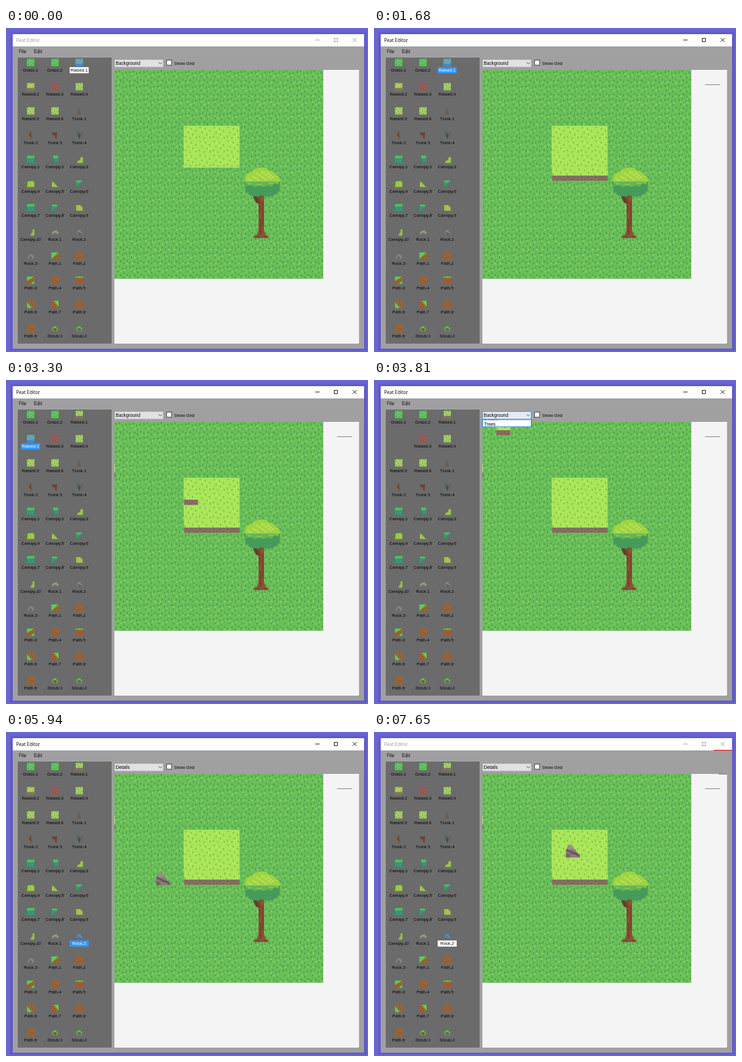
An HTML page that plays this animation: 648x580 px, repeating every 7770 ms.

```html
<!DOCTYPE html>
<html lang="en">
<head>
<meta charset="utf-8">
<title>Tile editor</title>
<style>
html, body { margin: 0; width: 100%; height: 100%; overflow: hidden; background: #6a65d4; }
svg { display: block; }
text { font-family: "Liberation Sans", Arial, sans-serif; font-size: 7.8px; }
.ui { font-family: "Open Sans", "Noto Sans", sans-serif; font-size: 8.4px; }
.combo { font-size: 8.2px; }
</style>
</head>
<body>
<svg id="stage" width="648" height="580" viewBox="0 0 648 580"></svg>
<script>
const LOOP = 7770, T = 374 / 15, MX = 194, MY = 75;
const NS = "http://www.w3.org/2000/svg";
const stage = document.getElementById("stage");

function el(name, attrs, parent = stage, text) {
  const e = document.createElementNS(NS, name);
  for (const k in attrs) e.setAttribute(k, attrs[k]);
  if (text) e.textContent = text;
  parent.appendChild(e);
  return e;
}
const box = (x, y, w, h, fill, p, more) => el("rect", { x, y, width: w, height: h, fill, ...more }, p);
const poly = (points, fill, p) => el("polygon", { points, fill }, p);
const line = (d, stroke, p, w = 1) => el("path", { d, stroke, fill: "none", "stroke-width": w }, p);
const show = (e, on) => e.setAttribute("display", on ? "inline" : "none");
const paint = (e, fill) => e.setAttribute("fill", fill);

// Tile patterns
const defs = el("defs", {});
const blades = (list, h) => list.map(([x, y]) => `M${x} ${y}h1.6v${h}h-1.6z`).join("");
function pattern(id, base, layers) {
  const p = el("pattern", { id, width: T, height: T, patternUnits: "userSpaceOnUse",
    patternTransform: `translate(${MX} ${MY})` }, defs);
  box(0, 0, T + 1, T + 1, base, p);
  for (const [color, list, h] of layers) el("path", { d: blades(list, h), fill: color }, p);
}
pattern("grass", "#6abf59", [
  ["#419753", [[2, 2], [8, 0.5], [14, 5], [20, 3], [5, 10], [16, 12], [22, 16], [10, 17], [2, 19], [16, 20.5]], 3.4],
  ["#54aa55", [[4, 3.5], [15.6, 13.5], [11.6, 18], [20.5, 5]], 2.6],
  ["#a4df55", [[5.5, 6], [18, 8], [11, 11], [6.5, 21], [22, 21.5]], 2.8]
]);
pattern("raised", "#abe659", [
  ["#66ad51", [[3, 2], [12.5, 4], [20, 8], [6.5, 11], [15, 14.5], [2, 18], [21, 20], [10, 21]], 3],
  ["#c0f070", [[8, 5], [18, 17], [12, 10]], 2.4]
]);

// Window frame
box(0, 0, 648, 580, "#6a65d4");
const shade = el("g", {});
[5, 3, 1].forEach(d => box(12 - d, 11 - d, 629 + 2 * d, 562 + 2 * d, "#302c80", shade, { opacity: 0.1 }));
box(12, 11, 629, 563, "#a0a0a0");
box(12, 11, 629, 22, "#fff");
const title = el("text", { x: 18, y: 25, class: "ui" }, stage, "Peat Editor");
const closeBg = box(608, 11, 33, 22, "#e81123");
const glyphs = el("g", { fill: "none" });
el("path", { d: "M553.5 21.5h8M587.5 18.5h6v6h-6zM620.5 18l7 7M627.5 18l-7 7" }, glyphs);
const redLine = box(608, 32, 33, 1.4, "#e81123");
el("text", { x: 23, y: 45, class: "ui" }, stage, "File");
el("text", { x: 50, y: 45, class: "ui" }, stage, "Edit");

// Tile list
box(21, 53, 168, 512, "#6b6b6b");
const full = "0,0 13,0 13,13 0,13";
const lime = "#9acb3a", teal = "#2f9d6b", mint = "#4fbd68", wood = "#8a5230", dark = "#663a2f",
  stone = "#94807e", soil = "#a0622e", leaf = "#5bca5c", pale = "#a6d05e", clay = "#8a6b60";
const low = "0,9 13,9 13,13 0,13";
const art = {
  Grass: () => [[full, leaf, "#3c9a50"]],
  Raised: n => n < 3 ? [[full, pale, "#6fa050"], [low, clay]] : n === 3 ? [[full, "#9c5a58", "#7d4444"]] : [[full, pale, "#5d9c4b"]],
  Trunk: n => [
    [["5,1 8,1 8,9 10,13 3,13 5,9", wood]],
    [["5,0 9,0 9,13 5,13", wood], ["4,3 6,3 6,9 4,7", dark]],
    [["2,1 7,3 10,1 10,12 7,12 6,8 2,5", dark], ["7,5 9,4 9,12 8,12", wood]],
    [["0,2 13,1 11,6 2,6", "#2c7d5a"], ["4,5 9,5 8,12 6,12", dark], ["5,3 10,3 8,6", wood]]
  ][n - 1],
  Canopy: n => [
    [[full, teal], ["0,0 13,0 13,4 0,5", mint]],
    [["3,0 12,0 12,12 7,12 5,8", teal], ["3,0 12,0 12,4 4,5", mint]],
    [["13,2 13,13 2,13 4,9 8,8 9,3", lime]],
    [["1,3 10,2 13,5 13,13 0,13", lime]],
    [["1,3 5,5 8,9 12,13 1,13", lime]],
    [["1,1 12,1 8,7 4,12 1,10", teal], ["1,1 12,1 10,4 2,5", mint]],
    [[full, teal], ["0,0 13,0 13,4 0,5", mint]],
    [["1,1 11,1 10,7 6,9 5,13 1,12", teal], ["1,1 11,1 10,4 1,5", mint]],
    [["1,2 8,2 12,6 13,12 1,12", lime]],
    [["13,1 13,13 6,13 8,9 10,8 10,2", lime]]
  ][n - 1],
  Rock: n => [
    [["1,8 5,4 10,4 13,9 11,12 6,9 1,11", "#a29483"], ["5,8 9,8 12,12 8,12", "#786763"]],
    [["2,11 4,4 8,3 11,8 13,12 9,11 6,8", stone], ["4,7 8,8 12,12 6,11", "#685459"]],
    [["1,11 4,5 9,3 13,7 9,12", stone], ["5,8 9,7 8,11 4,12", "#6c575a"]]
  ][n - 1],
  Path: n => [[full, soil, "#7d4a2c"]].concat(
    n === 1 ? [["0,0 13,0 0,12", leaf]] : n === 3 ? [["0,0 13,0 0,8", leaf], ["6,13 13,7 13,13", leaf]] :
    n === 5 ? [["0,0 13,0 13,2 0,2", leaf]] : n === 6 ? [["0,2 9,13 0,13", leaf]] :
    n === 7 ? [["4,0 13,0 13,11", leaf]] : []),
  Shrub: n => [["1,6 4,2 8,3 12,6 11,11 3,11", "#72a34a"], ["3,8 6,5 10,8 8,11", n < 2 ? "#4a6c3c" : "#3d7b37"],
    ["6,3 9,4 7,6", "#a5cf62"]]
};
const counts = { Grass: 2, Raised: 6, Trunk: 4, Canopy: 10, Rock: 3, Path: 9, Shrub: 2 };
const items = {};
let slot = 0;
for (const kind in counts) for (let n = 1; n <= counts[kind]; n++, slot++) {
  const cx = 44 + 43.5 * (slot % 3), y = 55.3 + 43.3 * Math.floor(slot / 3), name = kind + "." + n;
  const g = el("g", {}), icon = el("g", { transform: `translate(${cx - 6.3} ${y})` }, g);
  function draw(tint) {
    for (const [pts, fill, dots] of art[kind](n)) {
      poly(pts, tint || fill, icon);
      if (dots && !tint) el("path", { d: blades([[2, 2], [8, 1], [5, 6], [10, 7], [2, 9.5], [7, 10]], 1.5), fill: dots }, icon);
    }
  }
  draw();
  const before = icon.childNodes.length;
  draw("#3390f0");
  const tint = [...icon.childNodes].slice(before);
  tint.forEach(e => e.setAttribute("opacity", 0.6));
  const back = box(cx - 17, y + 14.8, 34, 11, "#fff", g);
  const label = el("text", { x: cx, y: y + 22.7, "text-anchor": "middle" }, g, name);
  items[name] = { g, tint, back, label };
}
function mark(name, mode) {
  const it = items[name];
  it.tint.forEach(e => show(e, mode));
  show(it.back, mode);
  paint(it.back, mode === "focus" ? "#3399ff" : "#fff");
  paint(it.label, mode === "focus" ? "#fff" : "#000");
}
Object.keys(items).forEach(name => mark(name, ""));

// Map
const clip = el("clipPath", { id: "view" }, defs);
box(194, 75, 438, 490, "#000", clip);
box(194, 75, 438, 490, "#f4f4f4");
const map = el("g", { "clip-path": "url(#view)" });
box(MX, MY, 374, 374, "url(#grass)", map);
box(318, 175, 100, 75, "url(#raised)", map, { rx: 3 });
box(318, 185, 100, 65, "url(#raised)", map);

const at = (e, c, r) => e.setAttribute("transform", `translate(${MX + c * T} ${MY + r * T})`);
function ledge() {
  const g = el("g", {}, map);
  box(0, 0, T + 0.2, 16, "url(#raised)", g);
  box(0, 15, T + 0.2, 9, "#8a6c65", g);
  el("path", { d: blades([[3, 17], [9, 20], [14, 17.5], [20, 20.5]], 1.8), fill: "#6b5150" }, g);
  box(0, 15, T + 0.2, 1, "#7b6058", g);
  return g;
}
function rock() {
  const g = el("g", {}, map);
  poly("0,25 0,10 2,9 3,5 7,2 10,2 12,7 17,11 20,16 24,19 25,25", "#8f7a79", g);
  poly("3,5 7,2 10,2 12,7 17,11 10,10 5,12", "#a08b88", g);
  poly("1,10 7,12 13,15 19,17 25,21 25,24 17,20 10,18 5,14 1,14", "#66525a", g);
  poly("0,18 4,17 8,21 6,25 0,25", "#786466", g);
  return g;
}
const ledges = [5, 6, 7, 8].map(c => { const g = ledge(); at(g, c, 7); return g; });
const placedRock = rock();
at(placedRock, 6, 5);

// Tree
poly("452,298 462,298 462,362 465,370 470,373 470,376 443,376 443,373 449,370 452,362", "#8b5034", map);
poly("442,300 450,300 452,306 453,315 447,312 444,306", "#69392c", map);
line("M454.5 303v28M459.5 310v46M455.5 342v27M449 374h4M463 374h4", "#6d3b2a", map, 1.6);
poly("427,276 490,274 490,291 486,296 480,298 478,301 465,302 455,299 449,302 437,300 434,296 429,292", "#459b58", map);
poly("428,274 490,272 488,280 480,279 476,284 467,282 461,285 452,282 446,285 438,281 430,283", "#63b657", map);
poly("428,275 428,266 433,261 440,257 445,252 453,250 464,250 472,255 480,259 486,264 490,269 490,275", "#9fd342", map);
line("M446 258l20 14M456 256l20 15M441 265l12 8M466 258l14 10M432 270l9 3", "#bbe760", map, 1.6);
line("M433 279h6M449 280h8M470 278h8M482 276h5", "#9fd342", map, 1.4);

const ghosts = [ledge(), rock()];
const scarTop = box(593, 101, 26, 1, "#77706f", map);
const scarLeft = el("g", {}, map);
box(194, 150, 1.2, 15, "#abe659", scarLeft);
box(194, 165, 1.2, 10, "#8a6c65", scarLeft);
const scarEdge = box(617, 75, 15, 1, "#77706f", map);

// Toolbar
const combo = box(194.5, 56.5, 87, 13.5, "#e1e1e1", stage, { stroke: "#adadad" });
const value = el("text", { x: 196.5, y: 66, class: "combo" });
line("M273 61.5l3 3l3-3", "#444");
box(287.5, 57.5, 9, 9, "#fff", stage, { stroke: "#333" });
el("text", { x: 301, y: 65.5 }, stage, "Show Grid");

// Drop-down list
const menuClip = el("clipPath", { id: "menu" }, defs);
const menuBox = box(194, 71, 88, 30, "#000", menuClip);
const menu = el("g", { "clip-path": "url(#menu)" });
const sheet = el("g", {}, menu);
box(194, 71, 88, 30, "#fff", sheet);
const rows = ["Background", "Details", "Trees"].map((name, i) => ({
  back: box(195, 71.5 + 9.6 * i, 86, 9.6, "#0078d7", sheet),
  label: el("text", { x: 197, y: 79.2 + 9.6 * i, class: "combo" }, sheet, name)
}));
const menuEdge = box(194.5, 71, 87, 29.5, "none", menu, { stroke: "#0078d7" });

// Hover path: start, end, steps, first cell, last cell, tile; no cell hides the tile
const path = [
  [120, 480, 8, 16, 0, 5, 7, 0], [960, 1020, 2, 6, 7, 7, 7, 0], [1200, 1200, 1, 8, 7, 8, 7, 0],
  [1590, 1650, 2, 6, 6, 1, 5, 0], [1680],
  [2310, 2550, 5, 0, 3, 5, 6, 0], [2700, 2700, 1, 6, 7, 6, 7, 0],
  [3300, 3510, 6, 5, 5, 1, 0, 0], [4500, 4620, 4, 1, 0, 0, 3, 0], [4680],
  [5730, 6060, 6, 0, 11, 5, 5, 1], [6330, 6330, 1, 6, 5, 6, 5, 1],
  [6960, 7110, 5, 8, 4, 14, 1, 1], [7170, 7230, 2, 15, 0, 17, -1, 1], [7290]
];
function hover(t) {
  const s = path.filter(p => p[0] <= t).pop();
  if (!s || s.length < 2) return null;
  const [a, b, n, c0, r0, c1, r1, tile] = s;
  const k = n < 2 ? 0 : Math.min(1, Math.floor((t - a) / (b - a) * (n - 1) + 1e-6) / (n - 1));
  return { c: Math.round(c0 + (c1 - c0) * k), r: Math.round(r0 + (r1 - r0) * k), tile };
}
const within = (t, a, b) => t >= a && t < b;
const ramp = (t, a, b) => Math.max(0, Math.min(1, (t - a) / (b - a)));

function render(t) {
  const active = within(t, 810, 7560);
  paint(title, active ? "#000" : "#999");
  shade.setAttribute("opacity", active ? 1 : 0.65);
  const red = ramp(t, 7350, 7410) * (1 - ramp(t, 7500, 7620));
  closeBg.setAttribute("opacity", red);
  glyphs.setAttribute("stroke", active ? "#000" : "#999");
  glyphs.lastChild.setAttribute("stroke-width", 1);
  show(redLine, t >= 7350);

  mark("Raised.1", t >= 2070 ? "" : t >= 1320 ? "focus" : "idle");
  mark("Raised.2", !within(t, 2070, 5550) ? "" : t < 3780 ? "focus" : "idle");
  mark("Rock.2", t < 5550 ? "" : t < 7560 ? "focus" : "idle");
  show(items["Raised.2"].g, !within(t, 3780, 3840));

  [810, 960, 1020, 1200].forEach((start, i) => show(ledges[i], t >= start));
  show(placedRock, t >= 6330);
  const h = hover(t);
  ghosts.forEach((g, i) => {
    const on = h && h.tile === i;
    show(g, on);
    if (on) at(g, h.c, h.r);
  });
  show(scarTop, t >= 172);
  show(scarLeft, t >= 2370);
  show(scarEdge, t >= 7290);

  const near = within(t, 3540, 4410), chosen = within(t, 4410, 5340);
  paint(combo, chosen ? "#cce4f7" : near ? "#e3ebf4" : "#e1e1e1");
  combo.setAttribute("stroke", chosen ? "#1c6fb5" : near ? "#4a94d4" : "#adadad");
  value.textContent = t < 4410 ? "Background" : "Details";

  show(menu, within(t, 3780, 4410));
  const height = Math.min(30, 6 + 7.2 * Math.max(0, Math.floor((t - 3780) / 30)));
  menuBox.setAttribute("height", height);
  menuEdge.setAttribute("height", height - 0.5);
  sheet.setAttribute("transform", `translate(0 ${height - 30})`);
  rows.forEach((row, i) => {
    const on = i === (t < 4110 ? 0 : 1);
    show(row.back, on);
    paint(row.label, on ? "#fff" : "#000");
  });
}

const start = performance.now();
function tick() {
  render((performance.now() - start) % LOOP);
  requestAnimationFrame(tick);
}
tick();
</script>
</body>
</html>
```
